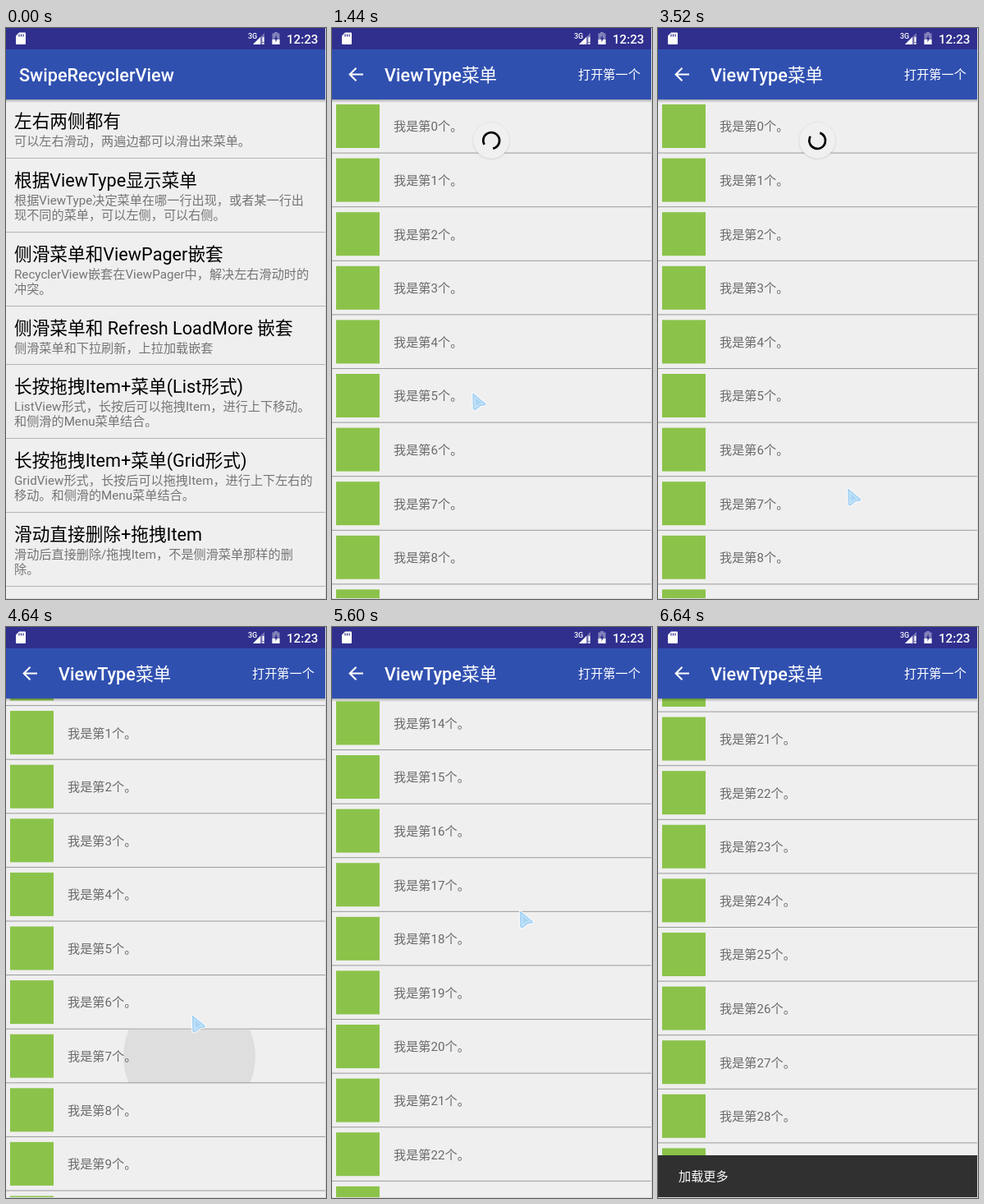
These frames come from a looping animation (390x695 px, 7280 ms). An HTML page with a canvas:

```html
<!DOCTYPE html>
<html lang="zh-CN">
<head>
<meta charset="utf-8">
<title>SwipeRecyclerView</title>
<style>
  html, body { margin: 0; width: 100%; height: 100%; overflow: hidden; background: #efefef; }
  canvas { display: block; width: 390px; height: 695px; }
</style>
</head>
<body>
<canvas id="stage" width="390" height="695"></canvas>
<script>
const ctx = document.getElementById('stage').getContext('2d');
const W = 390, H = 695, LOOP = 7280, STEP = 80;
const TOP = 87, ROW = 65.6, ROWS = 30;
const BG = '#efefef', STATUS = '#302f8e', BAR = '#3050b0', GREEN = '#8bc34a';
const LARGE = 21.67, SMALL = 15.17;

const MENU = [
  ['左右两侧都有', '可以左右滑动，两遍边都可以滑出来菜单。'],
  ['根据ViewType显示菜单', '根据ViewType决定菜单在哪一行出现，或者某一行出', '现不同的菜单，可以左侧，可以右侧。'],
  ['侧滑菜单和ViewPager嵌套', 'RecyclerView嵌套在ViewPager中，解决左右滑动时的', '冲突。'],
  ['侧滑菜单和 Refresh LoadMore 嵌套', '侧滑菜单和下拉刷新，上拉加载嵌套'],
  ['长按拖拽Item+菜单(List形式)', 'ListView形式，长按后可以拖拽Item，进行上下移动。', '和侧滑的Menu菜单结合。'],
  ['长按拖拽Item+菜单(Grid形式)', 'GridView形式，长按后可以拖拽Item，进行上下左右的', '移动。和侧滑的Menu菜单结合。'],
  ['滑动直接删除+拖拽Item', '滑动后直接删除/拖拽Item，不是侧滑菜单那样的删', '除。']
];

// Resting points of the pointer: time, x, y
const POINTER = [
  [80, 284, 416], [400, 242, 381], [800, 242, 381], [1520, 168, 446], [2240, 204, 415],
  [3040, 235, 560], [3840, 228, 560], [4320, 226, 472], [4640, 226, 472],
  [5200, 232, 641], [5440, 232, 641], [5600, 228, 345], [6560, 252, 628]
];

const smooth = p => p * p * (3 - 2 * p);
const easeOut = power => p => 1 - (1 - p) ** power;
const ramp = (t, start, duration, ease = smooth) =>
  ease(Math.min(1, Math.max(0, (t - start) / duration)));

// A slow drag, then two flings; the second one stops at the end of the list.
function scrollAt(t) {
  const end = ROWS * ROW - (H - 1 - TOP);
  const drag = 56.5, firstStop = 663.6;
  return drag * ramp(t, 3840, 480)
    + (firstStop - drag) * ramp(t, 4640, 560, easeOut(2))
    + (end - firstStop) * ramp(t, 5455, 705, easeOut(2));
}

function pointerAt(t) {
  const next = POINTER.findIndex(p => p[0] > t);
  if (next < 0) return POINTER[POINTER.length - 1].slice(1);
  const [t0, x0, y0] = POINTER[next - 1], [t1, x1, y1] = POINTER[next];
  const p = ramp(t, t0, t1 - t0);
  return [x0 + (x1 - x0) * p, y0 + (y1 - y0) * p];
}

function rect(x, y, w, h, color) {
  ctx.fillStyle = color;
  ctx.fillRect(x, y, w, h);
}

function text(str, x, y, size, color, weight = 400) {
  ctx.font = `${weight} ${size}px Roboto, "Noto Sans CJK SC", "Noto Sans CJK", sans-serif`;
  ctx.fillStyle = color;
  ctx.fillText(str, x, y);
  return x + ctx.measureText(str).width;
}

function shape(d, fill, stroke, width = 1) {
  const path = new Path2D(d);
  if (fill) { ctx.fillStyle = fill; ctx.fill(path); }
  if (stroke) { ctx.strokeStyle = stroke; ctx.lineWidth = width; ctx.stroke(path); }
}

function disc(x, y, r, color) {
  ctx.beginPath();
  ctx.arc(x, y, r, 0, 2 * Math.PI);
  ctx.fillStyle = color;
  ctx.fill();
}

function appBar(x, latin, chinese = '') {
  const shade = ctx.createLinearGradient(0, TOP, 0, TOP + 4);
  shade.addColorStop(0, 'rgba(0,0,0,.28)');
  shade.addColorStop(1, 'rgba(0,0,0,0)');
  rect(0, TOP, W, 4, shade);
  rect(0, 0, W, 26, STATUS);
  rect(0, 26, W, TOP - 26, BAR);
  text(chinese, text(latin, x, 65, LARGE, '#fff', 500), 65, LARGE, '#fff');
}

function menuScreen() {
  rect(0, 0, W, H, BG);
  let y = TOP;
  for (const [title, ...lines] of MENU) {
    text(title, 10, y + 34, LARGE, '#000');
    lines.forEach((line, i) => text(line, 10, y + 56 + 17.8 * i, SMALL, '#757575'));
    y += 54 + 17.9 * lines.length;
    rect(0, Math.round(y) - 1, W, 1, '#b4b4b4');
  }
  appBar(16, 'SwipeRecyclerView');
}

function spinner(t) {
  const scale = 1 - ramp(t, 3840, 200);
  if (t < 1040 || scale === 0) return;
  const turns = Math.max(0, (t - 1573) / 1333), n = Math.floor(turns), p = turns - n;
  const head = 0.8 * ramp(p, 0, 0.5), tail = 0.8 * ramp(p, 0.5, 0.5);
  const start = 0.417 + 0.8 * n + 0.4 * turns + tail;
  const sweep = turns ? Math.max(0.03, head - tail) : 0.8 * ramp(t, 1040, 400);

  ctx.save();
  ctx.translate(194.2, 62 + 75 * ramp(t, 1040, 400));
  ctx.scale(scale, scale);
  ctx.shadowColor = 'rgba(0,0,0,.18)';
  ctx.shadowBlur = 2;
  ctx.shadowOffsetY = 0.5;
  disc(0, 0, 22, '#f0f0f0');
  ctx.shadowColor = 'transparent';
  ctx.beginPath();
  ctx.arc(0, 0, 9.9, start * 2 * Math.PI, (start + sweep) * 2 * Math.PI);
  ctx.strokeStyle = '#000';
  ctx.lineWidth = 2.7;
  ctx.stroke();
  ctx.restore();
}

function ripple(t, y) {
  const age = t - 4640;
  if (age < 0 || age > 80) return;
  ctx.save();
  ctx.beginPath();
  ctx.rect(0, y, W, ROW);
  ctx.clip();
  disc(223.5, y + 33, 80.5 + age / 2, '#dedede');
  ctx.restore();
}

function listScreen(t) {
  const scroll = scrollAt(t);
  rect(0, 0, W, H, BG);
  for (let i = 0; i < ROWS; i++) {
    const y = TOP + ROW * i - scroll;
    if (y < TOP - ROW || y > H) continue;
    if (i === 7) ripple(t, y);
    rect(5, y + 6, 53, 53, GREEN);
    text(`我是第${i}个。`, 75, Math.round(y + 38.4), SMALL, '#6a6a6a');
    rect(0, y + ROW - 1, W, 1, '#9a9a9a');
  }
  spinner(t);
  appBar(64, 'ViewType', '菜单');
  shape('M38 56.5H22M29.5 48.7L21.7 56.5L29.5 64.3', null, '#fff', 2.1);
  text('打开第一个', 300, 62, SMALL, '#fff');

  const snackbar = H - 1 - 51 * ramp(t, 5920, 240, easeOut(2));
  rect(0, snackbar, W, 52, '#303030');
  text('加载更多', 25, snackbar + 31, SMALL, '#fff');
}

function statusIcons() {
  shape('M16 5.5H23Q24 5.5 24 6.5V19Q24 20 23 20H13Q12 20 12 19V9.5Z', '#fff');
  shape('M16 7.5V10.5M18.5 7.5V10.5M21 7.5V10.5', null, STATUS, 1.2);
  text('3G', 295, 13, 9, '#fff', 500);
  shape('M315 6V20H301Z', 'rgba(255,255,255,.35)');
  shape('M310 11V20H301Z', '#fff');
  rect(312.5, 11, 2, 6, '#fff');
  rect(312.5, 18, 2, 2, '#fff');
  shape('M327 5H331V6.5H333.5V20H324.5V6.5H327Z', 'rgba(255,255,255,.4)');
  rect(324.5, 14, 9, 6, '#fff');
  shape('M329.7 8.5L326.8 13.6H328.5V17.5L331.3 12.2H329.7Z', STATUS);
  text('12:23', 342, 19, SMALL, '#fff', 500);
}

function pointer(t) {
  if (t < 80 || t >= 6640) return;
  const arrow = 'M1.5 1.5L16 13.5Q16.5 15 14.5 15L10.5 15.5L4.5 20.5Q2.5 21 2 19.5Z';
  ctx.save();
  ctx.translate(...pointerAt(t));
  ctx.lineJoin = 'round';
  shape(arrow, null, 'rgba(255,255,255,.9)', 3.5);
  shape(arrow, '#bfe1f8', '#a3d0f3', 1.5);
  shape('M4.5 7L11.5 12.5L5 15.5Z', '#a9d4f3');
  ctx.restore();
}

function draw(t) {
  const opening = 682;
  if (t < opening + 200) menuScreen();
  if (t > opening) {
    ctx.save();
    ctx.globalAlpha = ramp(t, opening, 200, easeOut(5));
    ctx.translate(0, Math.round(0.08 * H * (1 - ramp(t, opening, 350, easeOut(5)))));
    listScreen(t);
    ctx.restore();
  }
  statusIcons();
  pointer(t);
  rect(W - 1, 0, 1, H, '#dcdcdc');
  rect(0, H - 1, W, 1, '#dcdcdc');
}

const begin = performance.now();
function frame() {
  const t = (performance.now() - begin) % LOOP;
  draw(Math.floor(t / STEP) * STEP);
  requestAnimationFrame(frame);
}
frame();
</script>
</body>
</html>
```
